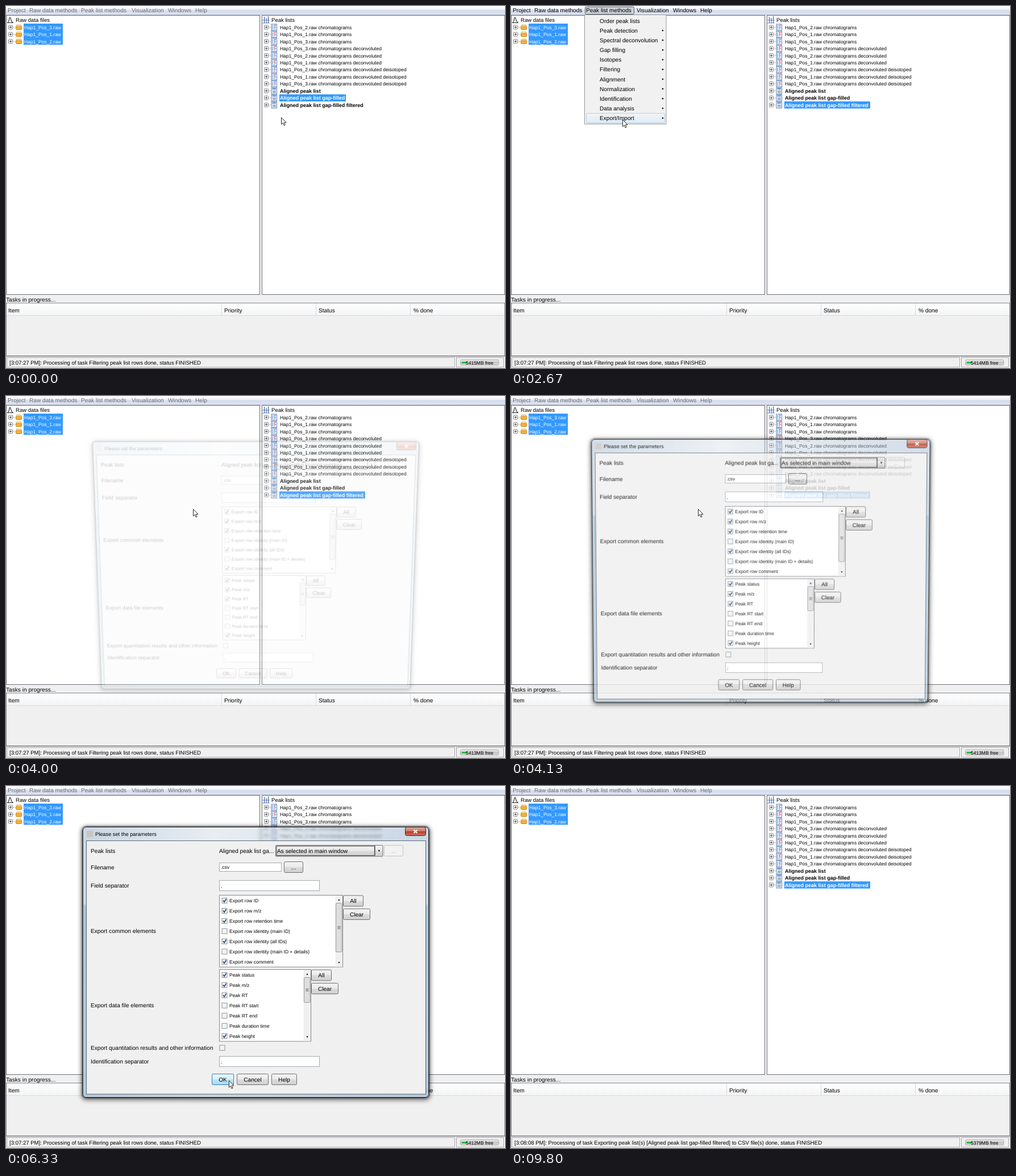
Recreate the animation shown at these times as an HTML page. Size 878 by 638 pixels, loop 9940 ms.

```html
<!DOCTYPE html>
<html lang="en">
<head>
<meta charset="utf-8">
<title>Peak list export</title>
<style>
html, body { margin: 0; width: 100%; height: 100%; overflow: hidden; background: #f0f0f0; }
#stage { position: absolute; left: 0; top: 0; width: 878px; height: 638px; overflow: hidden; }
#stage > *, #dialog > svg { position: absolute; left: 0; top: 0; width: 878px; height: 638px; }
svg { display: block; }
text { font-family: "Liberation Sans", Arial, sans-serif; font-size: 10.15px; fill: #000; text-rendering: geometricPrecision; white-space: pre; }
.mid { font-size: 9.57px; }
.small { font-size: 8.47px; }
.bold { font-size: 9.03px; font-weight: bold; }
.title { font-size: 9.25px; }
.grey { fill: #6d6d6d; }
.pale { fill: #aaa; }
.white { fill: #fff; }
.center { text-anchor: middle; }
.off { display: none; }
#dialog { transform-origin: 439.5px 310.5px; }
#glass {
  position: absolute; left: 135px; top: 72px; width: 607px; height: 475px;
  border: 1px solid #1c2329; border-radius: 6px;
  background:
    linear-gradient(180deg, transparent 134px, rgba(125, 175, 205, .5) 138px, rgba(150, 185, 210, .4)),
    linear-gradient(90deg, rgba(178, 196, 215, .7), rgba(212, 220, 228, .5) 38%, rgba(172, 192, 214, .65));
  box-shadow: inset 0 0 0 1px rgba(255, 255, 255, .6), 0 0 3px 1px rgba(0, 0, 0, .6), 0 2px 8px 2px rgba(0, 0, 0, .6);
  backdrop-filter: blur(2px);
}
</style>
</head>
<body>
<div id="stage">
  <svg id="main" viewBox="0 0 878 638">
    <defs>
      <linearGradient id="bar" x2="0" y2="1">
        <stop offset="0" stop-color="#fff"/><stop offset=".4" stop-color="#eef1f8"/>
        <stop offset=".5" stop-color="#d5dcec"/><stop offset="1" stop-color="#dde3f2"/>
      </linearGradient>
      <linearGradient id="btn" x2="0" y2="1">
        <stop offset="0" stop-color="#f3f3f3"/><stop offset=".5" stop-color="#ebebeb"/>
        <stop offset=".5" stop-color="#dddddd"/><stop offset="1" stop-color="#cfcfcf"/>
      </linearGradient>
      <linearGradient id="hot" x2="0" y2="1">
        <stop offset="0" stop-color="#eaf6fd"/><stop offset=".5" stop-color="#d9f0fc"/>
        <stop offset=".5" stop-color="#bee6fd"/><stop offset="1" stop-color="#a7d9f5"/>
      </linearGradient>
      <linearGradient id="pick" x2="0" y2="1">
        <stop offset="0" stop-color="#f1f5f9"/><stop offset="1" stop-color="#e0ebf5"/>
      </linearGradient>
      <linearGradient id="head" x2="0" y2="1">
        <stop offset="0" stop-color="#fff"/><stop offset="1" stop-color="#f3f4f6"/>
      </linearGradient>
      <linearGradient id="progress" x2="0" y2="1">
        <stop offset="0" stop-color="#f2f2f2"/><stop offset=".5" stop-color="#c4c4c4"/>
        <stop offset="1" stop-color="#d8d8d8"/>
      </linearGradient>
      <linearGradient id="red" x2="0" y2="1">
        <stop offset="0" stop-color="#e0aa9e"/><stop offset=".48" stop-color="#cd7566"/>
        <stop offset=".5" stop-color="#b23c28"/><stop offset="1" stop-color="#cf7260"/>
      </linearGradient>
    </defs>
  </svg>
  <div id="dialog"><div id="glass"></div><svg id="form" viewBox="0 0 878 638"></svg></div>
  <svg id="top" viewBox="0 0 878 638">
    <path id="cursor" d="M.5.5V12.6L3.3 10 5.2 14.6 7.2 13.7 5.3 9.3H9Z" fill="#fff" stroke="#111" stroke-width=".9"/>
  </svg>
</div>
<script>
const LOOP = 9940, STEP = 200 / 3;
const $ = id => document.getElementById(id);

// Drawing helpers
const text = (x, y, s, cls = '') => `<text x="${x}" y="${y}" class="${cls}">${s}</text>`;
const rect = (x, y, w, h, fill, stroke = 'none', r = 0) =>
  `<rect x="${x}" y="${y}" width="${w}" height="${h}" fill="${fill}" stroke="${stroke}" rx="${r}"/>`;
const path = (d, stroke, fill = 'none', w = 1) =>
  `<path d="${d}" stroke="${stroke}" fill="${fill}" stroke-width="${w}"/>`;
const tri = (x, y, dx, dy) =>
  `<path d="M${x + dx} ${y + dy}L${x - dx - dy} ${y - dy + dx}L${x - dx + dy} ${y - dy - dx}Z" fill="#111"/>`;
// Group visible only during the given time spans
const during = (spans, body) => `<g data-on="${spans}">${body}</g>`;

// Trees
const expander = (x, y) =>
  path(`M${x + 7} ${y}h5`, '#aaa', 'none', .7) +
  rect(x, y - 3.5, 7, 7, '#f8f8f8', '#888', 1) +
  path(`M${x + 1.5} ${y}h4M${x + 3.5} ${y - 2}v4`, '#333', 'none', .9);

const folder = y =>
  rect(18, y - 4, 9, 5, '#fff3c8', '#d99a2b', 1) +
  rect(17.5, y - 1.5, 10, 5.5, '#f7b233', '#c9821c', 1.5);

const sheet = (y, table) => {
  let s = rect(467, y - 5.5, 9.5, 11, '#f4f8ff', '#5b86bd');
  if (!table) return s + path(`M471.5 ${y - 3.5}h3.5M471.5 ${y + .5}h3.5`, '#c43a3a') +
    path(`M469 ${y - 4}v8M471 ${y - 1.5}h3M471 ${y + 3}h3`, '#4a6fae', 'none', .8);
  return s + path(`M468.5 ${y - 3.5}h6.5`, '#3f6fc0', 'none', 1.6) +
    path(`M470 ${y - 1}v5M472 ${y - 1}v5M474 ${y - 1}v5`, '#55657c', 'none', .9);
};

const rawTree = () => {
  let s = path('M2 29.5H13M3 29C6 28 5.500 20 7 20S8.500 28 12 29', '#222', 'none', 1.1) + text(17, 28, 'Raw data files', 'mid');
  s += rect(31, 31, 69, 37.3, '#3399ff');
  [3, 1, 2].forEach((n, i) => {
    const y = 37.5 + i * 12.45;
    s += expander(4.5, y) + folder(y) + text(32, y + 3.2, `Hap1_Pos_${n}.raw`, 'small white');
  });
  return s;
};

const bold = ['Aligned peak list', 'Aligned peak list gap-filled', 'Aligned peak list gap-filled filtered'];
const peakTree = () => {
  let s = path('M451 25H464M451 30H464', '#6a8fd0') + path('M454.500 19V30M458 21V30M461.500 18V30', '#2d4d90') +
    text(467, 28, 'Peak lists', 'mid');
  const kinds = ['', ' deconvoluted', ' deconvoluted deisotoped'];
  const order = [2, 1, 3, 3, 2, 1, 2, 1, 3];
  const names = order.map((n, i) => `Hap1_Pos_${n}.raw chromatograms${kinds[Math.floor(i / 3)]}`).concat(bold);
  names.forEach((name, i) => {
    const y = 37.5 + i * 12.45, table = i > 8;
    s += expander(454.5, y) + sheet(y, table) + text(482, y + 3.2, name, table ? 'bold' : 'small');
  });
  const picked = (i, w) => rect(481, 31.2 + i * 12.45, w, 12.5, '#3399ff') +
    text(482, 40.7 + i * 12.45, bold[i - 9], 'bold white');
  return s + during('0-730', picked(10, 117)) + during('730-9940', picked(11, 151)) +
    during('730-1670 7330-9800', rect(481.5, 168.7, 150, 11.5, 'none', '#123a66'));
};

// Menu bar and popups
const menuBar = cls => [[3, 'Project'], [41, 'Raw data methods'], [132, 'Peak list methods'],
  [221, 'Visualization'], [285, 'Windows'], [333, 'Help']].map(([x, s]) => text(x, 11, s, cls)).join('');

const PITCH = 17.15;
const popup = () => {
  const items = ['Order peak lists', 'Peak detection', 'Spectral deconvolution', 'Gap filling', 'Isotopes',
    'Filtering', 'Alignment', 'Normalization', 'Identification', 'Data analysis', 'Export/Import'];
  return rect(129.5, 15.5, 143.5, 192.5, '#f1f1f1', '#979797') +
    `<rect id="hover" x="132.5" width="138" height="17" rx="2" fill="url(#pick)" stroke="#b4cfe6"/>` +
    items.map((s, i) => text(156, 29.6 + i * PITCH, s) + (i ? tri(267.5, 26 + i * PITCH, 1.7, 0) : '')).join('');
};
const submenu = () => {
  const items = ['Export to CSV file', 'Export to XML file', 'Import from XML file', 'Export to SQL database'];
  return rect(271.5, 187.5, 146, 72, '#f1f1f1', '#979797') +
    `<rect id="subhover" x="274.5" y="189.5" width="140" height="17" rx="2" fill="url(#pick)" stroke="#b4cfe6"/>` +
    items.map((s, i) => text(298, 201.2 + i * PITCH, s)).join('');
};

// Task table and status line
const taskTable = () => {
  let s = text(0, 520.5, 'Tasks in progress...') + rect(.5, 523.5, 877, 93, '#f0f0f0', '#82868d') +
    rect(1, 524, 876, 21, 'url(#head)') + path('M1 545.500H877M379.500 524V545M545.500 524V545M711.500 524V545', '#d8dade');
  [[4, 'Item'], [384, 'Priority'], [550, 'Status'], [717, '% done']].forEach(([x, t]) => s += text(x, 540, t));
  return s + during('7330-7600', rect(1, 546, 876, 13, '#fff') +
    path('M1 559.500H877M379.500 546V559M545.500 546V559M711.500 546V559', '#999') +
    text(1, 556, `Exporting peak list(s) [${bold[2]}] to CSV file(s)`, 'small') +
    text(381, 556, 'NORMAL', 'small') + text(547, 556, 'PROCESSING', 'small') +
    rect(712.5, 547.5, 164.5, 10.5, 'url(#progress)', '#777', 1) + text(794.5, 556, '0%', 'small center'));
};

const statusLine = () => {
  const box = (x, w) => rect(x, 619.5, w, 17, '#f0f0f0', '#a8a8a8') + path(`M${x} 637.500h${w + 1}v-18`, '#fff');
  const job = `Exporting peak list(s) [${bold[2]}] to CSV file(s)`;
  const says = (span, s) => during(span, text(6, 632, s, 'mid'));
  let s = path('M0 617.500H878', '#a5a5a5') + box(1.5, 788) + box(792.5, 83) +
    says('0-7330', '[3:07:27 PM]: Processing of task Filtering peak list rows done, status FINISHED') +
    says('7330-7600', `[3:08:08 PM]: Starting processing of task ${job}`) +
    says('7600-9940', `[3:08:08 PM]: Processing of task ${job} done, status FINISHED`) +
    rect(799.5, 623.5, 67.5, 9.5, 'url(#progress)', '#b0b0b0', 2) + rect(802, 627, 9, 3, '#22c038');
  [[5415, 0, 2530], [5414, 2530, 3530], [5413, 3530, 4600], [5412, 4600, 6600], [5411, 6600, 7730], [5379, 7730, LOOP]]
    .forEach(([n, a, b]) => s += during(`${a}-${b}`, text(809, 631.5, `${n}MB free`, 'small')));
  return s;
};

// Parameter dialog
const button = (x, y, w, h, s, cls = '') =>
  rect(x + .5, y + .5, w - 1, h - 1, cls ? '#f2f2f2' : 'url(#btn)', cls ? '#c3c3c3' : '#707070', 2) +
  text(x + w / 2, y + h / 2 + 3.6, s, 'center ' + cls);
const field = (y, w, h, s) => rect(375.5, y, w, h, '#fff', '#a5aab2') + text(378, y + h / 2 + 3, s, 'small');
const check = (x, y, on) => rect(x + .5, y - 4.5, 9, 9, '#f1f3f5', '#8f9399') +
  (on ? path(`M${x + 2.5} ${y - .5}l2 3 3.500 -5.500`, '#2c4776', 'none', 1.7) : '');
const checkList = (y, w, thumb, items) => {
  const x = 375.5 + w - 13;
  let s = rect(375.5, y, w, 126.5, '#fff', '#82868d') + rect(x, y + .5, 12.5, 125.5, '#f0f0f0') +
    tri(x + 6.5, y + 8, 0, -1.6) + tri(x + 6.5, y + 119, 0, 1.6) +
    rect(x + 1, y + 14, 10.5, thumb, '#dedede', '#9a9a9a', 1.5);
  for (let k = -2; k < 3; k += 2) s += path(`M${x + 4} ${y + 14 + thumb / 2 + k}h5`, '#666', 'none', .9);
  items.forEach((t, i) => {
    const on = t[0] == '+', cy = y + 9.5 + i * 17.95;
    s += check(379.5, cy, on) + text(393, cy + 3, t.slice(1), 'small');
  });
  return s;
};

const form = () => {
  let s = rect(141.5, 96.5, 597, 446.5, '#f0f0f0', '#5c6b79') +
    rect(142, 79, 11, 11, '#c9c5c0') + text(157, 87.6, 'Please set the parameters', 'title') +
    rect(702.5, 72.5, 36, 15, 'url(#red)', '#4a2722', 3) +
    path('M717.500 77.500l6 5.500m0 -5.500l-6 5.500', '#fff', 'none', 1.8);
  [['Peak lists', 118], ['Filename', 146.5], ['Field separator', 178.6], ['Export common elements', 259],
    ['Export data file elements', 390], ['Export quantitation results and other information', 465],
    ['Identification separator', 489]].forEach(([t, y]) => s += text(149, y, t));
  s += text(375, 118, 'Aligned peak list ga...') + rect(474.5, 104.5, 188.5, 19.5, 'url(#btn)', '#707070', 1) +
    rect(476, 106, 172.5, 16.5, 'none', '#444') + path('M649.500 105V124', '#888') +
    text(477, 118, 'As selected in main window') + tri(656.5, 114.5, 0, 1.7) +
    button(665, 104, 34, 20, '...', 'pale') +
    field(135.5, 109, 15, '.csv') + button(489, 133, 34, 20, '...') +
    field(166.5, 176, 18, ',') + field(476.5, 176, 18, ';') + check(375.5, 461.5, false);
  s += checkList(192.5, 217, 86, ['+Export row ID', '+Export row m/z', '+Export row retention time',
    '-Export row identity (main ID)', '+Export row identity (all IDs)',
    '-Export row identity (main ID + details)', '+Export row comment']);
  s += checkList(323.5, 161, 44, ['+Peak status', '+Peak m/z', '+Peak RT', '-Peak RT start', '-Peak RT end',
    '-Peak duration time', '+Peak height']);
  s += button(593, 192.5, 36, 20, 'All') + button(593, 216, 48, 20, 'Clear') +
    button(537, 323.5, 36, 20, 'All') + button(537, 347, 48, 20, 'Clear') +
    button(362, 507, 39, 20, 'OK') + button(406, 507, 56, 20, 'Cancel') + button(467, 507, 45, 20, 'Help');
  return s + during('6130-7400', rect(362.5, 507.5, 38, 19, 'url(#hot)', '#3c7fb1', 2) + text(381.5, 520.6, 'OK', 'center'));
};

$('main').insertAdjacentHTML('beforeend',
  rect(0, 0, 878, 15.5, 'url(#bar)') + path('M0 15.500H878', '#c0c6d4') +
  during('1530-1670', rect(130.5, 1.5, 86, 13, '#eceef3', '#a0a5ae', 2)) +
  during('1670-3870', rect(130.5, 1.5, 86, 13, '#ced2da', '#555b66', 2)) +
  during('0-730 3870-7330 9800-9940', menuBar('grey')) + during('730-3870 7330-9800', menuBar('')) +
  rect(.5, 16.5, 446, 492, '#fff', '#6c7077') + rect(450.5, 16.5, 427, 492, '#fff', '#6c7077') +
  rawTree() + peakTree() + taskTable() + statusLine() +
  during('1670-3870', popup()) + during('2730-3870', submenu()));
$('form').innerHTML = form();

const layers = [...document.querySelectorAll('[data-on]')].map(el => ({
  el, spans: el.dataset.on.split(' ').map(s => s.split('-').map(Number))
}));

// Pointer stops: time, x, y, eased arrival
const stops = [[0, 484, 196], [400, 507, 175, 1], [867, 507, 175], [1530, 197, 8, 1], [2067, 197, 8],
  [2600, 196, 200, 1], [3067, 196, 200], [3600, 329, 199, 1], [4940, 329, 199], [5005, 322, 222],
  [5200, 313, 285], [5480, 336, 400], [5800, 392, 520], [5930, 398, 533], [6530, 390, 514, 1],
  [8399, 390, 514], [8400, 371, 596], [LOOP, 371, 596]];
const pointer = t => {
  const i = Math.max(1, stops.findIndex(s => s[0] >= t));
  const [a, b] = [stops[i - 1], stops[i]];
  let u = (t - a[0]) / (b[0] - a[0]);
  if (b[3]) u = u * u * (3 - 2 * u);
  return [a[1] + (b[1] - a[1]) * u, a[2] + (b[2] - a[2]) * u];
};

const drawDialog = t => {
  const d = $('dialog'), on = t >= 4000 && t < 7400;
  d.classList.toggle('off', !on);
  if (!on) return;
  let left = Math.max(0, 1 - Math.floor((t - 4000) / STEP) / 4);
  if (t >= 7330) left = .8;
  d.style.opacity = 1 - .8 * left ** 2.2;
  d.style.transform = left ? `translateY(${-6 * left ** 2.6}px) perspective(674px) ` +
    `rotateX(${-5 * left ** 2.15}deg) scale(${1 - .083 * left ** 1.57})` : 'none';
};

const draw = now => {
  const t = Math.floor((now % LOOP + 5) / STEP) * STEP + 5;
  for (const { el, spans } of layers) el.classList.toggle('off', !spans.some(([a, b]) => t >= a && t < b));
  const [x, y] = pointer(Math.min(t, LOOP));
  $('cursor').setAttribute('transform', `translate(${x.toFixed(1)} ${y.toFixed(1)})`);
  $('cursor').classList.toggle('off', t >= 8470);
  const item = Math.min(10, Math.floor((y - 17.5) / PITCH));
  $('hover').setAttribute('y', 17.7 + item * PITCH);
  $('hover').classList.toggle('off', item < 0);
  $('subhover').classList.toggle('off', x < 272);
  drawDialog(t);
};

const start = performance.now();
const tick = () => {
  draw(performance.now() - start);
  requestAnimationFrame(tick);
};
tick();
</script>
</body>
</html>
```
